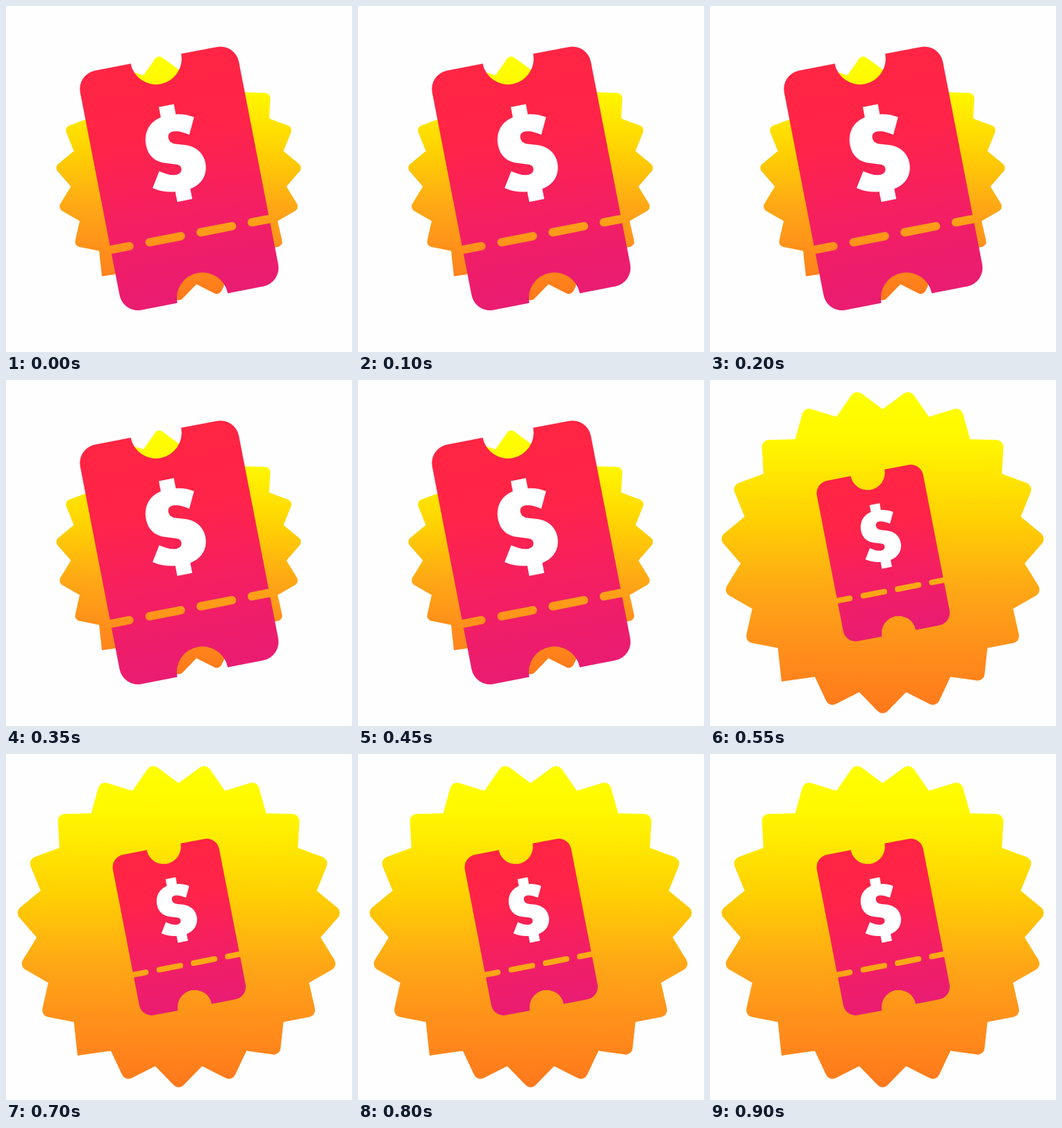
Recreate the animation shown at these times as an HTML page with a canvas. Size 498 px wide and 498 px high, loop 1 s.

```html
<!DOCTYPE html>
<html lang="en">
<head>
<meta charset="utf-8">
<title>Ticket badge</title>
<style>
html, body { margin: 0; width: 100%; height: 100%; overflow: hidden; background: #fefefe; }
canvas { display: block; width: 498px; height: 498px; }
</style>
</head>
<body>
<canvas id="stage" width="498" height="498"></canvas>
<script>
const ctx = document.getElementById('stage').getContext('2d');
const LOOP = 1000, SWITCH = 550;
const TILT = -11 * Math.PI / 180;

function gradient(y0, y1, stops) {
  const g = ctx.createLinearGradient(0, y0, 0, y1);
  stops.forEach(([at, color]) => g.addColorStop(at, color));
  return g;
}

// Star burst with rounded tips; one lower-left tip stays sharp.
function burstPath() {
  const tips = 19, outer = 237, inner = 205, sharp = 17;
  const at = (k, r) => {
    const a = k * 2 * Math.PI / tips;
    return [r * Math.sin(a), r * Math.cos(a)];
  };
  const p = new Path2D();
  p.moveTo(...at(-0.5, inner));
  for (let k = 0; k < tips; k++) {
    const tip = at(k, outer), valley = at(k + 0.5, inner);
    if (k === sharp) p.lineTo(...tip);
    else p.arcTo(...tip, ...valley, 10);
    p.lineTo(...valley);
  }
  p.closePath();
  return p;
}

// Ticket with two notches and a perforation cut out (even-odd).
function ticketPath() {
  const w = 116.3, h = 175.5, r = 27, notch = 37;
  const p = new Path2D();
  p.moveTo(-w, 0);
  p.arcTo(-w, -h, 0, -h, r);
  p.arc(0, -h, notch, Math.PI, 0, true);
  p.arcTo(w, -h, w, 0, r);
  p.arcTo(w, h, 0, h, r);
  p.arc(0, h, notch, 0, Math.PI, true);
  p.arcTo(-w, h, -w, 0, r);
  p.closePath();

  const hole = (x0, x1, radii) => p.roundRect(x0, 76, x1 - x0, 12, radii);
  hole(-w, -83, [0, 6, 6, 0]);
  hole(-65.5, -7.5, 6);
  hole(9.5, 67.5, 6);
  hole(84.5, w, [6, 0, 0, 6]);
  return p;
}

const burst = burstPath();
const ticket = ticketPath();
const dollar = new Path2D(
  'M-11 -69.5 H11 V-54.5 C20 -53.5 28 -50.5 36 -45.5 L24.5 -22 ' +
  'C17 -27 9 -31 2 -31 C-3 -31 -6 -28 -6 -23 C-6 -17 -2 -14 4 -12.2 ' +
  'L15.7 -8.7 C30 -4 39.5 7 39.5 22 C39.5 40 28 52 11 54.8 ' +
  'V69.7 H-11 V54.6 C-22 53.5 -33 49.5 -42 43.2 L-28 21.2 ' +
  'C-20 27 -12 31 -5 31 C1 31 4 28 4 23 C4 18.5 0 16.8 -6 15 ' +
  'L-16.7 11.5 C-31 7 -39.5 -3 -39.5 -19 C-39.5 -37 -29 -51 -11 -54.5 Z');

const gold = gradient(-230, 232, [
  [0, '#ffff00'], [0.15, '#fff700'], [0.4, '#ffd003'],
  [0.62, '#fea716'], [0.8, '#ff8f1b'], [1, '#ff781c']
]);
const red = gradient(-176, 176, [
  [0, '#ff2543'], [0.3, '#ff2448'], [0.65, '#f41f62'], [1, '#e91c72']
]);

function place(x, y, scale, angle, draw) {
  ctx.save();
  ctx.translate(x, y);
  ctx.rotate(angle);
  ctx.scale(scale, scale);
  draw();
  ctx.restore();
}

function fill(path, color, rule = 'nonzero') {
  ctx.fillStyle = color;
  ctx.fill(path, rule);
}

function render(time) {
  const big = time % LOOP >= SWITCH;
  ctx.fillStyle = '#fefefe';
  ctx.fillRect(0, 0, 498, 498);

  place(248.5, 247, big ? 1 : 0.759, 0, () => fill(burst, gold));
  place(249.3, big ? 249 : 248.2, big ? 0.67 : 1, TILT, () => {
    fill(ticket, red, 'evenodd');
    ctx.translate(1.8, -37);
    fill(dollar, '#fff');
  });
}

const start = performance.now();
function tick() {
  render(performance.now() - start);
  requestAnimationFrame(tick);
}
tick();
</script>
</body>
</html>
```
